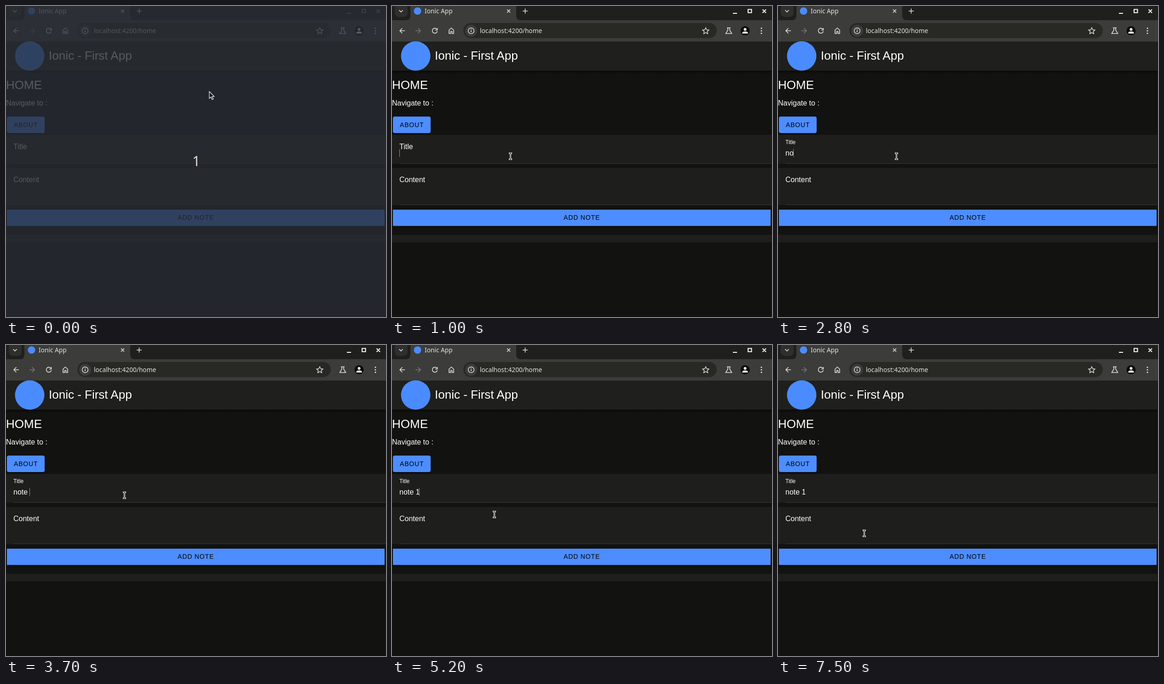
Write an HTML page that moves like this. It is 826x678 px and loops after 8 s.

```html
<!DOCTYPE html>
<html lang="en">
<head>
<meta charset="utf-8">
<title>Notes form</title>
<style>
  html, body { margin: 0; width: 826px; height: 678px; overflow: hidden; background: #121210; }
  svg { display: block; }
  text { font: 16px "Liberation Sans", Arial, sans-serif; fill: #fff; white-space: pre; }
  .chrome { font: 13.7px "Noto Sans", sans-serif; fill: #e4e4e0; }
  .big { font-size: 26px; }
  .label { font-size: 14px; letter-spacing: .84px; fill: #000; }
  .button { fill: #4d8dff; filter: drop-shadow(0 2px 2px #0006); }
  .line { fill: none; stroke: #dededa; stroke-width: 1.6; }
  .item { fill: #1e1e1c; }
  .rule { fill: #3a3a38; }
  .caret { fill: #2dd55b; }
  .count { font: 30px "Noto Sans", sans-serif; fill: #deded2; }
</style>
</head>
<body>
<svg width="826" height="678" viewBox="0 0 826 678">
  <defs>
    <linearGradient id="shade" x2="0" y2="1">
      <stop stop-color="#000" stop-opacity=".5"/>
      <stop offset="1" stop-color="#000" stop-opacity="0"/>
    </linearGradient>
  </defs>

  <!-- Tab strip -->
  <rect width="826" height="32" fill="#1f201e"/>
  <rect x="6" y="-4" width="28" height="28" rx="9" fill="#2f302d"/>
  <path d="M30 31Q40 31 40 21V0H270V21Q270 31 280 31Z" fill="#3c3c3a"/>
  <path class="line" d="M15.5 9l4 4 4-4M250 7.5l7 7m0-7l-7 7M284 11h11M289.500 5.500v11"/>
  <circle cx="55.500" cy="11" r="8" fill="#4a8cff"/>
  <text class="chrome" x="71" y="16">Ionic App</text>
  <path id="controls" fill="none" stroke-width="2" d="M741 16h9M774 7.500h7.500v7h-7.500zM805.500 7.500l7.500 7.500m0-7.500l-7.500 7.500"/>

  <!-- Toolbar -->
  <rect y="31" width="826" height="47" fill="#3c3c3a"/>
  <rect x="155" y="37" width="551" height="33" rx="16.500" fill="#282924"/>
  <circle cx="172" cy="54" r="13" fill="#3c3c3a"/>
  <path class="line" d="M28 54H17m5.500-5.500L17 54l5.500 5.500"/>
  <path class="line" style="stroke:#777775" d="M51 54h11m-5.500-5.500L62 54l-5.500 5.500"/>
  <path class="line" d="M97.500 50.500A5.500 5.500 0 1 0 98.500 55M98.500 48v4.500H94"/>
  <path class="line" d="M124 52.500l5-4.500 5 4.500V60h-3.500v-4.500h-3V60H124z"/>
  <g class="line">
    <circle cx="172" cy="54" r="6.300" stroke-width="1.500"/>
    <path d="M172 53v4M172 50.200v1.600"/>
  </g>
  <text class="chrome" x="191" y="59">localhost:<tspan>4200/home</tspan></text>
  <path class="line" stroke-linejoin="round" style="stroke-width:1.400" d="M682 47l2 4.800 5.200.4-4 3.400 1.300 5.100-4.500-2.800-4.500 2.800 1.300-5.100-4-3.400 5.200-.4z"/>
  <path class="line" d="M728 47.500h8M730 48v4.500l-4.500 7.500h13l-4.500-7.500V48"/>
  <circle cx="767.500" cy="54" r="10" fill="#0c0c0b"/>
  <g fill="#fff">
    <circle cx="767.500" cy="51" r="3"/>
    <path d="M761.500 60v-1.500q0-3 6-3t6 3V60z"/>
  </g>
  <g fill="#dededa">
    <circle cx="803" cy="48.500" r="1.600"/>
    <circle cx="803" cy="54" r="1.600"/>
    <circle cx="803" cy="59.500" r="1.600"/>
  </g>

  <!-- Page -->
  <rect y="77.500" width="825" height="63.500" fill="#1f1f1d"/>
  <rect y="141" width="825" height="7" fill="url(#shade)"/>
  <circle cx="51.500" cy="109" r="32" fill="#4a8cff"/>
  <text class="big" x="93" y="117">Ionic - First App</text>
  <text class="big" x="0" y="181">HOME</text>
  <text x="0" y="217">Navigate to :</text>
  <rect class="button" x="2" y="241" width="82" height="36" rx="4"/>
  <text class="label" x="17" y="264">ABOUT</text>

  <rect class="item" y="281" width="825" height="63"/>
  <rect class="rule" x="16" y="343" width="809" height="1"/>
  <text id="title" x="16">Title</text>
  <text id="input" x="16" y="326"></text>

  <rect class="item" y="353" width="825" height="81"/>
  <rect class="rule" x="16" y="433" width="809" height="1"/>
  <text x="16" y="384">Content</text>

  <rect class="button" x="2" y="444" width="821" height="35.500"/>
  <text class="label" x="373" y="466">ADD NOTE</text>
  <rect class="item" y="499" width="825" height="16"/>
  <rect id="caret" class="caret" width="1" height="17"/>
  <rect x="825" y="78" width="1" height="600" fill="#1b1b19"/>

  <!-- Countdown -->
  <g id="countdown">
    <rect width="826" height="678" fill="#282c34" fill-opacity=".78"/>
    <text class="count" x="405" y="349">1</text>
  </g>

  <!-- Pointers, each with its hot spot at 0,0 -->
  <path id="arrow" fill="#0c0c0b" stroke="#fff" stroke-width="1.200" d="M0 .5V15.500L3.500 12.300 6 18 8.500 17 6 11.300H10.500Z"/>
  <g id="beam" fill="none">
    <path stroke="#fff" stroke-width="3" d="M-3.500-6.500h7M-3.500 6.500h7M0-6.500v13"/>
    <path stroke="#0c0c0b" d="M-2.500-6.500h5M-2.500 6.500h5M0-6.500v13"/>
  </g>
</svg>
<script>
const LOOP = 8000, STEP = 100;
const el = id => document.getElementById(id);
const clamp = v => Math.max(0, Math.min(1, v));
const ease = v => v * v * (3 - 2 * v);
const mix = (a, b, p) => a + (b - a) * p;
const show = (id, on) => el(id).setAttribute('visibility', on ? 'visible' : 'hidden');

// [time, typed text]
const typing = [[0, ''], [1800, 'n'], [2800, 'no'], [3000, 'not'], [3100, 'note'], [3700, 'note '], [4100, 'note 1']];
const caretX = [16, 24, 33, 38, 47, 51, 59];
// [caret appears, caret disappears]
const blinks = [[1000, 1500], [1800, 2400], [2800, 4600], [5100, 5800], [5900, 6400], [6900, 7500]];
// [start, end, from, to]
const moves = [[300, 700, [442, 186], [258, 328]], [4900, 5500, [258, 328], [188, 411]]];

function pointer(t) {
  const [start, end, from, to] = t < 2000 ? moves[0] : moves[1];
  const p = ease(clamp((t - start) / (end - start)));
  return from.map((v, i) => Math.round(mix(v, to[i], p)));
}

function draw(t) {
  show('countdown', t < 100);
  el('controls').setAttribute('stroke', t < 1000 ? '#858582' : '#fff');

  const rise = clamp((t - 1700) / 300);
  el('title').setAttribute('y', mix(312, 301, rise));
  el('title').style.fontSize = mix(16, 12, rise) + 'px';

  const text = typing.filter(([at]) => at <= t).pop()[1];
  el('input').textContent = text;

  const inContent = t >= 5800;
  show('caret', blinks.some(([on, off]) => t >= on && t < off));
  el('caret').setAttribute('x', inContent ? 16 : caretX[text.length]);
  el('caret').setAttribute('y', inContent ? 390 : 312);

  const [x, y] = pointer(t);
  const overField = y > 281 && !(y > 343 && y < 353);
  show('arrow', !overField);
  show('beam', overField);
  el('arrow').setAttribute('transform', `translate(${x} ${y})`);
  el('beam').setAttribute('transform', `translate(${x - .5} ${y - .5})`);
}

const begin = performance.now();
function tick() {
  const t = (performance.now() - begin) % LOOP;
  draw(Math.floor(t / STEP) * STEP);
  requestAnimationFrame(tick);
}
tick();
</script>
</body>
</html>
```
